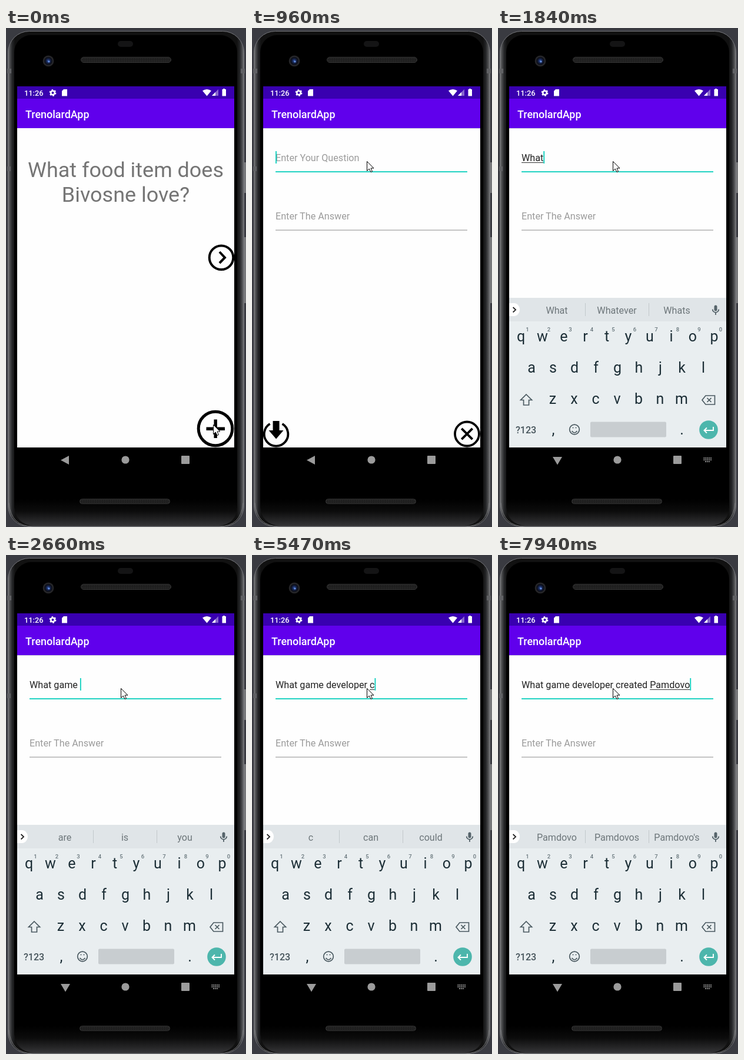
Animation of 408 by 847 pixels, one loop 8 s. Source, as an HTML page:

```html
<!DOCTYPE html>
<html lang="en">
<head>
<meta charset="utf-8">
<title>Flashcards</title>
<style>
  html, body { margin: 0; width: 100%; height: 100%; overflow: hidden; background: #3a3b41; }
  svg { display: block; width: 408px; height: 847px; }
  text { font-family: Roboto, sans-serif; white-space: pre; }
  .mid { text-anchor: middle; }
  .edit { font-size: 16.16px; }
  .bar { font-size: 17.96px; font-weight: 500; fill: #fff; }
  .sug { font-size: 16.1px; fill: #6c7579; }
  .key { font-size: 25px; fill: #1c2e36; }
  .num { font-size: 9.5px; fill: #66747a; font-weight: 500; }
  .line { fill: none; stroke: #000; }
  .ico { fill: none; stroke: #4b5a61; stroke-width: 1.7; }
</style>
</head>
<body>
<svg viewBox="0 0 408 847">
  <defs>
    <linearGradient id="rim" x2="1" y2="0">
      <stop offset="0" stop-color="#77787a"/><stop offset=".008" stop-color="#4a4b4d"/>
      <stop offset=".018" stop-color="#232426"/><stop offset=".03" stop-color="#111"/>
      <stop offset=".97" stop-color="#111"/><stop offset=".982" stop-color="#232426"/>
      <stop offset=".992" stop-color="#4a4b4d"/><stop offset="1" stop-color="#77787a"/>
    </linearGradient>
    <linearGradient id="chin" x2="0" y2="1">
      <stop offset="0" stop-color="#000"/><stop offset=".45" stop-color="#0c0c0c"/>
      <stop offset="1" stop-color="#353537"/>
    </linearGradient>
    <radialGradient id="lens">
      <stop offset="0" stop-color="#3c62b8"/><stop offset=".35" stop-color="#15224a"/>
      <stop offset=".65" stop-color="#0b0d14"/><stop offset=".8" stop-color="#2b2b2e"/>
      <stop offset="1" stop-color="#1b1b1d"/>
    </radialGradient>
    <pattern id="mesh" width="3" height="3" patternUnits="userSpaceOnUse">
      <rect width="3" height="3" fill="#1a1a1a"/><rect width="1.5" height="1.5" fill="#363636"/>
    </pattern>
    <clipPath id="app"><rect x="19" y="99" width="369" height="618"/></clipPath>
    <clipPath id="dock"><rect x="19" y="440" width="369" height="274"/></clipPath>
  </defs>

  <!-- phone -->
  <g fill="#77787a">
    <rect x="404" y="228" width="4" height="52"/><rect x="404" y="355" width="4" height="112"/>
  </g>
  <rect x="3.5" y="5.5" width="401" height="841" rx="36" fill="url(#rim)" stroke="#75767a"/>
  <rect x="14" y="12" width="379" height="825" rx="29"/>
  <path d="M14 800H393V812Q392 842 362 845H46Q16 842 14 812Z" fill="url(#chin)"/>
  <path d="M5 806Q8 846 46 846H362Q400 846 403 806" fill="none" stroke="#77787a"/>
  <g fill="#606164">
    <rect x="2" y="69" width="7" height="8"/><rect x="399" y="69" width="7" height="8"/>
    <rect x="2" y="235" width="6" height="8"/>
  </g>
  <rect x="190" y="22" width="26" height="10" rx="5" fill="#141415"/>
  <g fill="url(#mesh)" stroke="#343434">
    <rect x="127.5" y="49.5" width="153" height="9" rx="4.5"/>
    <rect x="125.5" y="799.5" width="153" height="8" rx="4"/>
  </g>
  <circle cx="72" cy="56" r="9.5" fill="url(#lens)"/>
  <circle cx="73" cy="57" r="1.5" fill="#6d98e8"/>

  <!-- app screens -->
  <g clip-path="url(#app)">
    <g id="home">
      <rect x="19" y="99" width="369" height="613" fill="#fefefe"/>
      <rect x="19" y="120" width="369" height="50" fill="#6000ec"/>
      <text class="bar" x="33" y="152.5">TrenolardApp</text>
      <g class="mid" font-size="35.95" fill="#757575">
        <text x="203.5" y="253">What food item does</text>
        <text x="203.5" y="295">Bivosne love?</text>
      </g>
      <g class="line">
        <circle cx="366" cy="389.7" r="20.3" stroke-width="4"/>
        <path d="M363 380L372 389.7L363 399" stroke-width="4"/>
        <circle cx="356" cy="680" r="28.8" stroke-width="5"/>
        <path d="M340.5 680.3H372M356.2 664.5V696" stroke-width="5.4"/>
      </g>
    </g>
    <g id="form">
      <rect x="19" y="120" width="369" height="592" fill="#fefefe"/>
      <rect x="19" y="120" width="369" height="50" fill="#6000ec"/>
      <rect x="19" y="170" width="369" height="1" fill="#d8d8dc"/>
      <text class="bar" x="33" y="152.5">TrenolardApp</text>
      <text class="edit" id="ask" x="40" y="226"></text>
      <rect id="compose" y="228" height="1" fill="#333"/>
      <rect id="caret" y="209" width="1.8" height="21" fill="#0bcfbd"/>
      <rect id="rule" x="40" width="326"/>
      <text class="edit" x="40" y="325" fill="#9b9b9b">Enter The Answer</text>
      <rect x="40" y="342.5" width="326" height="1.2" fill="#a0a0a0"/>
      <g class="line" stroke-width="3.8">
        <path d="M30.5 671.9A20.3 20.3 0 1 0 51.5 671.9"/>
        <circle cx="365.5" cy="689" r="20.5"/>
        <path d="M356.3 679.8L374.7 698.2M374.7 679.8L356.3 698.2"/>
      </g>
      <path d="M35.5 667H46.5V683H53.5L41 697.5L28.5 683H35.5Z"/>
    </g>
  </g>

  <!-- status bar -->
  <rect x="19" y="99" width="369" height="21" fill="#3900b0"/>
  <g id="shade">
    <rect x="19" y="99" width="369" height="10" fill="#3f00b6"/>
    <rect x="19" y="109" width="369" height="19" fill="#4b00c6"/>
  </g>
  <g fill="#fff">
    <text x="31" y="114.5" font-size="12.8" font-weight="500">11:26</text>
    <circle cx="79.5" cy="110" r="3.3" fill="none" stroke="#fff" stroke-width="2.6"/>
    <circle cx="79.5" cy="110" r="4.9" fill="none" stroke="#fff" stroke-width="2" stroke-dasharray="2.57 2.56"/>
    <path d="M98 104H104V115.5H95V107Z"/>
    <path d="M334 106.5Q341.5 101.5 349 106.5L341.5 115.5Z"/>
    <path d="M361 104V115H350Z" opacity=".4"/><path d="M356 109V115H350Z"/>
    <path d="M369 104V103H372V104H374V115.5H367.500V104Z"/>
  </g>

  <!-- keyboard -->
  <g clip-path="url(#dock)">
    <g id="board">
      <rect x="19" y="458" width="369" height="254" fill="#e9eef0"/>
      <rect x="19" y="458" width="369" height="40" fill="#e0e5e8"/>
      <path d="M19 467H27A10 11 0 0 1 27 489H19Z" fill="#fff"/>
      <path d="M25.500 474L30 478.300L25.500 482.500" fill="none" stroke="#222" stroke-width="1.8"/>
      <path d="M148.500 467V489M256.500 467V489" stroke="#c2c8cb"/>
      <g id="sugs"></g>
      <rect x="367.500" y="470.500" width="5" height="10" rx="2.500" fill="#56646b"/>
      <path class="ico" d="M364.700 477.500A5.300 5.300 0 0 0 375.300 477.500M370 483V487"/>
      <g id="keys"></g>
      <path class="ico" d="M48 622L57.500 631.500H52.500V640H43.500V631.500H38.500Z"/>
      <path class="ico" d="M353 624H368.500V639H353L347 631.500ZM355.500 628L362.500 635M362.500 628L355.500 635"/>
      <text x="30" y="687.500" font-size="16" font-weight="500" fill="#46545b">?123</text>
      <text class="key mid" x="94" y="689.500" font-size="23">,</text>
      <circle class="ico" cx="130" cy="681.500" r="8.300"/>
      <path class="ico" d="M125.500 684Q130 690 134.500 684M126.500 678.500H128.500M131.500 678.500H133.500"/>
      <rect x="157" y="668.500" width="129" height="26" rx="2" fill="#c8cdd0"/>
      <text class="key mid" x="312.500" y="689.500">.</text>
      <circle cx="358" cy="682" r="15.800" fill="#4db6ac"/>
      <path d="M366 677V683H351M355 678.500L350.500 683L355 687.500" fill="none" stroke="#fff" stroke-width="1.900"/>
    </g>
  </g>

  <!-- navigation -->
  <g fill="#9b9b9b">
    <path id="back"/>
    <circle cx="203" cy="733" r="6.600"/>
    <rect x="298" y="726" width="14" height="14" rx="1"/>
    <path id="swap" d="M349.500 730H363M349.500 733H363M352 736H361" fill="none" stroke="#9b9b9b" stroke-width="1.800" stroke-dasharray="1.800 1.100"/>
  </g>
  <path id="mouse" d="M.5 .5V16.500L4.200 13L7 18.500L9.500 17.500L7 12H12Z" fill="#fff" stroke="#000"/>
</svg>
<script>
const $ = id => document.getElementById(id);
const set = (el, attrs) => { for (const k in attrs) el.setAttribute(k, attrs[k]); };
const show = (id, on) => set($(id), { visibility: on ? 'visible' : 'hidden' });

function label(parent, cls, x, y, str) {
  const el = document.createElementNS('http://www.w3.org/2000/svg', 'text');
  set(el, { class: cls, x, y });
  el.textContent = str;
  return $(parent).appendChild(el);
}

[['qwertyuiop', 39, 532], ['asdfghjkl', 57, 584.5], ['zxcvbnm', 93, 637.5]].forEach(([row, x, y], r) =>
  [...row].forEach((c, i) => {
    label('keys', 'key mid', x + i * 36.5, y, c);
    if (!r) label('keys', 'num mid', 50 + i * 36.5, 514.5, (i + 1) % 10);
  }));
const sugs = [100, 202, 304].map(x => label('sugs', 'sug mid', x, 484.500, ''));

// Opening: time, pointer x, pointer y, form offset, form opacity, keyboard offset, keyboard opacity
const opening = [
  [0, 352, 673, 0, 0, 0, 0],
  [120, 318, 640, 30, .6, 0, 0],
  [260, 238, 556, 5, 1, 0, 0],
  [400, 215, 430, 0, 1, 0, 0],
  [530, 206, 325, 0, 1, 0, 0],
  [670, 198, 250, 0, 1, 0, 0],
  [810, 195, 226, 0, 1, 0, 0],
  [1090, 195, 226, 0, 1, 34, .55],
  [1210, 195, 226, 0, 1, 1.500, .92],
  [1340, 195, 226, 0, 1, 0, 1]
];
const FOCUS = 950;

// Typing: time, text ("|" starts the word in progress), suggestions
const typing = [
  [0, '', 'thanks,I,we'],
  [1470, '|W', 'W,We,What'],
  [1840, '|What', 'What,Whatever,Whats'],
  [1990, 'What ', 'is,are,the'],
  [2280, 'What |g', 'g,good,great'],
  [2410, 'What |ga', 'ga,game,gave'],
  [2540, 'What |game', 'game,gamer,games'],
  [2660, 'What game ', 'are,is,you'],
  [3240, 'What game |d', 'd,do,did'],
  [3390, 'What game |de', 'de,dear,den'],
  [3540, 'What game |dev', 'dev,device,devil'],
  [3690, 'What game |deve', 'deve,develop,development'],
  [3960, 'What game |develop', 'develop,developer,developed'],
  [4110, 'What game |developer', 'developer,developers,develop'],
  [4260, 'What game developer ', 'is,and,for'],
  [5470, 'What game developer |c', 'c,can,could'],
  [5750, 'What game developer |cr', 'cr,create,credit'],
  [5880, 'What game developer |cre', 'cre,create,credit'],
  [6010, 'What game developer |creat', 'creat,create,creation'],
  [6140, 'What game developer |created', 'created,create,creates'],
  [6270, 'What game developer created ', 'the,a,this'],
  [6410, 'What game developer created |P', 'P,*A,Please'],
  [6660, 'What game developer created |Pa', 'Pa,Part,Park'],
  [6810, 'What game developer created |Pam', 'Pam,Pamper,Pan'],
  [7090, 'What game developer created |Pamd', 'Pamd,Pamdovo,Paid'],
  [7520, 'What game developer created |Pamdo', 'Pamdo,Pamdovo,Pamdovos'],
  [7730, 'What game developer created |Pamdov', 'Pamdov,Pamdovo,Pamdovos'],
  [7940, 'What game developer created |Pamdovo', "Pamdovo,Pamdovos,Pamdovo's"]
];

const at = (steps, t) => steps.findLast(s => s[0] <= t);

function draw(t) {
  const [, mx, my, formY, formA, keyY, keyA] = at(opening, t);
  const [, raw, words] = at(typing, t);
  const focus = t >= FOCUS, ask = $('ask');

  set($('mouse'), { transform: `translate(${mx} ${my})` });
  set($('form'), { transform: `translate(0 ${formY})`, opacity: formA });
  set($('board'), { transform: `translate(0 ${keyY})`, opacity: keyA });
  show('home', formA < 1);
  show('shade', formY > 0);
  show('swap', keyA > 0);
  set($('back'), { d: keyA ? 'M93 728H109L101 741.500Z' : 'M107 726V741L93 733.500Z' });
  set($('rule'), focus ? { y: 243.200, height: 1.800, fill: '#0bcfbd' } : { y: 243.500, height: 1.200, fill: '#a0a0a0' });

  const text = raw.replace('|', ''), from = raw.indexOf('|');
  ask.textContent = text || 'Enter Your Question';
  set(ask, { fill: text ? '#222' : '#9b9b9b' });
  const end = text ? ask.getComputedTextLength() : 0;
  const start = from > 0 ? ask.getSubStringLength(0, from) : from < 0 ? end : 0;
  set($('caret'), { x: 40 + end });
  show('caret', focus && !(t >= 4670 && t < 5220));
  set($('compose'), { x: 40 + start, width: end - start });

  words.split(',').forEach((w, i) => {
    const bold = w[0] === '*';
    sugs[i].textContent = bold ? w.slice(1) : w;
    sugs[i].style.cssText = bold ? 'font-weight:700;fill:#000' : '';
  });
}

const t0 = performance.now();
(function tick() {
  draw((performance.now() - t0) % 8000);
  requestAnimationFrame(tick);
})();
</script>
</body>
</html>
```
